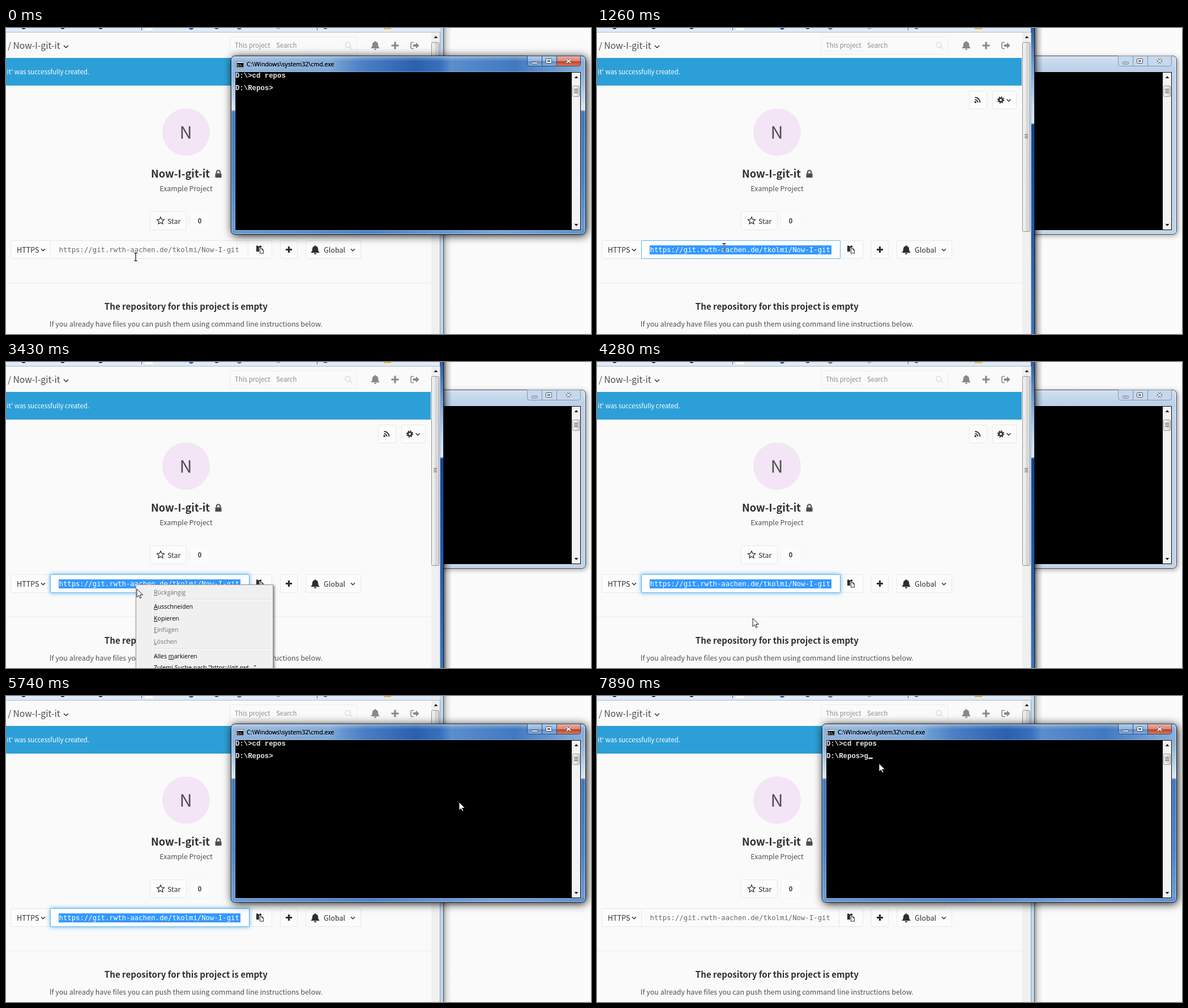
Animation, 1033 px wide and 542 px high, one loop 8000 ms. Source, as an HTML page with a canvas:

```html
<!DOCTYPE html>
<html lang="en">
<head>
<meta charset="utf-8">
<title>Clone address</title>
<style>
html, body { margin: 0; width: 100%; height: 100%; overflow: hidden; background: #fbfbfb; }
canvas { display: block; }
</style>
</head>
<body>
<canvas id="stage" width="1033" height="542"></canvas>
<script>
const ctx = document.getElementById('stage').getContext('2d');
const LOOP = 8000;
const WEB = '"Noto Sans CJK JP", "Noto Sans CJK SC", "Noto Sans CJK", "Open Sans", sans-serif';
const SYSTEM = '"Open Sans", "Noto Sans", sans-serif';
const MONO = '"DejaVu Sans Mono", monospace';
const CONSOLE = '"Liberation Mono", monospace';
const DARK = '#2e2e2e', BODY = '#505050', GREY = '#8c8c8c', LINE = '#e7e7e7';

// Pointer poses: start time, shape, x, y
const POINTER = [
  [0, 'beam', 229, 405.5], [550, 'beam', 229, 402.5], [710, 'beam', 226, 393.5], [850, 'beam', 224.5, 388.5],
  [2160, 'beam', 227, 391], [2290, 'beam', 229.5, 392.5],
  [3430, 'arrow', 231, 402], [3550, 'arrow', 249, 442], [3700, 'arrow', 265, 458], [3850, 'arrow', 270, 456],
  [3980, 'arrow', 275, 454], [4590, 'arrow', 261, 449], [4890, 'arrow', 310, 425], [5010, 'arrow', 490, 335],
  [5140, 'arrow', 721, 219], [5290, 'arrow', 787, 193], [5440, 'arrow', 800, 188],
  [6200, 'arrow', 640, 174], [6330, 'arrow', 502, 160], [6480, 'arrow', 500, 140],
  [6610, 'arrow', 499, 126], [6730, 'arrow', 498, 119.5]
];
const CARET = [[280, 850], [6330, 6880], [7340, 7740], [7890, LOOP]];

const BELL = 'M0-8c-1 0-1 1-1 1.200c-3 .6-4.200 3-4.200 5.800 0 3-1 4.500-2.800 6H8c-1.800-1.500-2.800-3-2.800-6 0-2.800-1.200-5.200-4.200-5.800 0-.2 0-1.200-1-1.200zM-2.200 5.800a2.200 2.200 0 0 0 4.400 0z';
const ARROW = 'M0 0v14.500l3.400-3.100 2.300 5 2.200-1-2.300-4.900h4.900z';
const BEAM = 'M-3-7h2l1 1 1-1h2M0-6v12M-3 7h2l1-1 1 1h2';

function rect(x, y, w, h, fill) {
  ctx.fillStyle = fill;
  ctx.fillRect(x, y, w, h);
}

function box(x, y, w, h, r, stroke, fill) {
  ctx.beginPath();
  ctx.roundRect(x + .5, y + .5, w - 1, h - 1, r);
  if (fill) { ctx.fillStyle = fill; ctx.fill(); }
  if (stroke) { ctx.lineWidth = 1; ctx.strokeStyle = stroke; ctx.stroke(); }
}

function disc(x, y, r, fill) {
  ctx.fillStyle = fill;
  ctx.beginPath();
  ctx.arc(x, y, r, 0, 7);
  ctx.fill();
}

function text(str, x, y, size, color, font = WEB, align = 'left', weight = 'normal') {
  ctx.font = `${weight} ${size}px ${font}`;
  ctx.textAlign = align;
  ctx.fillStyle = color;
  ctx.fillText(str, x, y);
}

function shape(path, x, y, fill, stroke, width = 1) {
  const p = new Path2D(path);
  ctx.save();
  ctx.translate(x, y);
  if (fill) { ctx.fillStyle = fill; ctx.fill(p); }
  if (stroke) { ctx.strokeStyle = stroke; ctx.lineWidth = width; ctx.stroke(p); }
  ctx.restore();
}

// stops: offset, color, offset, color ...
function gradient(x0, y0, x1, y1, ...stops) {
  const g = ctx.createLinearGradient(x0, y0, x1, y1);
  for (let i = 0; i < stops.length; i += 2) g.addColorStop(stops[i], stops[i + 1]);
  return g;
}

function shadow(color, blur, offset = 0) {
  ctx.shadowColor = color;
  ctx.shadowBlur = blur;
  ctx.shadowOffsetX = ctx.shadowOffsetY = offset;
}

const chevron = (x, y, size = 3.5) =>
  shape(`M${-size}${-size / 2}L0 ${size / 2}L${size}${-size / 2}`, x, y, null, DARK, 1.5);
const plus = (x, y, r, color) => shape(`M${-r} 0H${r}M0 ${-r}V${r}`, x, y, null, color, 3.2);
const triangle = (x, y, dir) => shape(`M-3.500 ${-2 * dir}h7L0 ${2 * dir}z`, x, y, '#222');
const button = (x, y, w, h) => box(x, y, w, h, 2, LINE, '#fcfcfc');

function star(x, y, r) {
  ctx.beginPath();
  for (let i = 0; i < 10; i++) {
    const a = i * Math.PI / 5 - Math.PI / 2, d = i % 2 ? r * .46 : r;
    ctx.lineTo(x + d * Math.cos(a), y + d * Math.sin(a));
  }
  ctx.closePath();
  ctx.strokeStyle = DARK;
  ctx.lineWidth = 1.2;
  ctx.stroke();
}

function gear(x, y) {
  ctx.strokeStyle = DARK;
  ctx.lineWidth = 2.6;
  ctx.beginPath();
  ctx.arc(x, y, 3.3, 0, 7);
  ctx.stroke();
  ctx.lineWidth = 2;
  ctx.beginPath();
  ctx.setLineDash([5.2 * Math.PI / 8, 5.2 * Math.PI / 8]);
  ctx.arc(x, y, 5.2, 0, 2 * Math.PI);
  ctx.stroke();
  ctx.setLineDash([]);
}

function bookmarkBar() {
  rect(0, 0, 766, 7, '#dfebf8');
  rect(0, 7, 766, 1, '#a9b9cb');
  [31, 100, 167].forEach(x => disc(x, -2, 4, '#222'));
  rect(239, 0, 1, 4, '#555');
  rect(245, 0, 14, 4, '#fff');
  disc(327, -1, 4, '#2c5fa8');
  disc(372, -2, 4, '#345');
  disc(412, -1, 4, '#777');
  disc(481, -2, 4, '#9ab');
  rect(549, 0, 1, 4, '#555');
  disc(564, -2, 4, '#567');
  rect(667, 0, 13, 2, '#f0b429');
}

function header() {
  text('/', 3, 37, 15.7, BODY);
  text('Now-I-git-it', 12.5, 37, 15.7, '#4c4c4c');
  chevron(106, 33, 4);
  box(395, 15, 225, 32, 2, '#ececec', '#fafafa');
  rect(400, 40, 72, 1, '#efefef');
  text('This project', 404, 35, 11.4, GREY);
  text('Search', 477, 35, 11.4, GREY);
  shape('M4 0a4.500 4.500 0 1 0-9 0a4.500 4.500 0 1 0 9 0M3 3l4 4', 604, 30, null, '#dcdcdc', 1.6);
  shape(BELL, 652, 31, '#888');
  plus(687, 31, 6.5, '#888');
  shape('M-2-5.500h-3q-2 0-2 2v7q0 2 2 2h3', 722, 31, null, '#888', 1.6);
  shape('M-3-2h5v-3.500l5.500 5.500-5.500 5.500v-3.500h-5z', 722, 31, '#888');
}

function urlField(focus, glow) {
  const url = 'https://git.rwth-aachen.de/tkolmi/Now-I-git';
  if (focus) {
    ctx.save();
    if (glow) shadow('rgba(45,160,235,.75)', 7);
    box(78, 376, 352, 33, 1, '#62b5ec', '#fff');
    ctx.restore();
    box(78, 376, 352, 33, 1, '#62b5ec', '#fdfdfd');
    rect(93, 385, 321, 16, '#3399ff');
  } else {
    box(78, 376, 350, 33, 0, LINE, '#fbfbfb');
  }
  text(url, 93.5, 397, 12.3, focus ? '#fff' : '#6a6a6a', MONO);
}

function project(focus, glow) {
  disc(318, 184.5, 42, '#f3e5f5');
  text('N', 317.5, 196, 30.5, BODY, WEB, 'center');
  text('Now-I-git-it', 308, 265, 18.3, DARK, WEB, 'center', 'bold');
  shape('M-5.500 0h11v7.500h-11z', 375, 257.5, '#4c4c4c');
  shape('M-3.200 0v-2a3.200 3.200 0 0 1 6.400 0v2', 375, 257.5, null, '#4c4c4c', 2);
  text('Example Project', 318, 289, 12.4, BODY, WEB, 'center');

  button(254, 325, 65, 33);
  star(273, 341.5, 6.8);
  text('Star', 285, 346.5, 12.4, DARK);
  box(325, 325, 35, 33, 2, '#f5f5f5', '#fcfcfc');
  shape('M4-5l-4 5 4 5', 322, 342, '#fafafa', '#e6e6e6');
  text('0', 342, 346, 11, DARK, WEB, 'center', 'bold');

  button(427, 376, 43, 33);
  button(8, 376, 71, 33);
  text('HTTPS', 19, 397.5, 12.6, DARK);
  chevron(65.5, 393);
  urlField(focus, glow);
  shape('M-6-6.500h9v3.500h-4v7h-5zM0-2h4l3 3v6.500h-7z', 448, 392, DARK);
  shape('M1-1h2.500v2.500h2.500v5h-5z', 448, 392, '#fafafa');
  rect(445, 384.5, 3, 2, '#fafafa');
  button(484, 376, 31, 33);
  plus(499.500, 392.500, 5.5, DARK);
  button(529, 376, 98, 33);
  shape(BELL, 546, 393, DARK);
  text('Global', 561, 397.5, 12.6, DARK);
  chevron(612.500, 393);

  rect(0, 451, 751, 1, '#ebebeb');
  text('The repository for this project is empty', 317.8, 499, 15.1, DARK, WEB, 'center', 'bold');
  text('If you already have files you can push them using command line instructions below.',
    317.8, 529, 12.47, BODY, WEB, 'center');
}

function browser(active, focus, glow) {
  rect(773, 0, 14, 542, gradient(773, 0, 787, 0, 0, active ? 'rgba(0,0,0,.6)' : 'rgba(0,0,0,.32)',
    .4, active ? 'rgba(0,0,0,.22)' : 'rgba(0,0,0,.1)', 1, 'rgba(0,0,0,0)'));
  rect(0, 0, 766, 542, '#fafafa');
  bookmarkBar();
  header();
  rect(0, 53, 750, 49, '#2d9fd8');
  text("it' was successfully created.", 147, 82, 11.4, '#fff', WEB, 'right');

  button(657, 111, 32, 33);
  disc(668.2, 131.2, 1.8, DARK);
  shape('M0-5a5 5 0 0 1 5 5M0-9a9 9 0 0 1 9 9', 667.5, 132, null, DARK, 2);
  button(698, 111, 43, 33);
  gear(713, 127.500);
  chevron(727, 128);
  project(focus, glow);

  // page scrollbar and window edge
  rect(751, 8, 15, 534, '#f0f0f0');
  triangle(759, 16, -1);
  box(751, 25, 14, 336, 2, '#8e8e8e', gradient(751, 0, 765, 0, 0, '#f6f6f6', .5, '#e6e6e6', .51, '#d4d4d4', 1, '#dedede'));
  for (let y = 188; y < 196; y += 3) rect(755, y, 6, 1, '#555');
  rect(766, 0, 6, 542, active
    ? gradient(0, 0, 0, 542, 0, '#2c5fa7', .12, '#6f9fd5', .25, '#c4dcf2', .31, '#dbe9f6', .316, '#14448f', .6, '#1f57a8', 1, '#3b78c2')
    : '#c3d7ee');
  rect(766, 8, 1, 534, active ? '#8fb4dd' : '#8b9eb5');
  rect(772, 0, 1, 542, active ? '#0b1526' : '#4b5866');
}

function windowButtons(active) {
  const edge = active ? '#2b4a74' : '#8294aa';
  const blue = gradient(0, 50, 0, 68, 0, '#b5cde8', .48, '#8fb3dc', .5, '#5a8bc7', 1, '#8ab2e2');
  const red = gradient(0, 50, 0, 68, 0, '#e9b0a4', .48, '#da8476', .5, '#bf3a22', 1, '#de8262');
  const pale = '#c6d8ed';
  box(920, 49, 27, 19, [0, 0, 0, 4], edge, active ? blue : pale);
  box(946, 49, 27, 19, 0, edge, active ? blue : pale);
  box(972, 49, 43, 19, [0, 0, 4, 0], edge, active ? red : pale);
  box(928, 60, 11, 4, 1, '#3e4a58', '#fff');
  box(953, 54, 11, 9, 1, '#3e4a58', '#fff');
  box(956, 57, 5, 3, 0, '#3e4a58', active ? '#5b89c0' : pale);
  const cross = 'M-3.500-3l7 6M3.500-3l-7 6';
  shape(cross, 993.5, 58.5, null, '#4a4f58', 3.8);
  shape(cross, 993.5, 58.5, null, '#fff', 2);
}

function consoleWindow(active, typed, caret) {
  ctx.save();
  shadow(active ? 'rgba(0,0,0,.95)' : 'rgba(0,0,0,.4)', active ? 16 : 8, 2);
  box(397, 49, 627, 317, 7, null, active ? '#3a70b8' : '#bfd3ec');
  ctx.restore();

  ctx.save();
  ctx.beginPath();
  ctx.roundRect(397, 49, 627, 317, 7);
  ctx.clip();
  if (active) {
    const side = gradient(0, 50, 0, 366, 0, '#6f9dd2', .14, '#97bae0', .3, '#dce8f4', .31, '#4079c2', .7, '#4a84cb', 1, '#6c9fda');
    rect(397, 49, 627, 317, side);
    rect(397, 49, 627, 29, gradient(397, 0, 1024, 0, 0, '#92b4db', .28, '#78a4d6', .37, '#4a80c4', .52, '#2a60ae',
      .59, '#3770bb', .62, '#5a8ecd', .8, '#4079c1', 1, '#8db1db'));
    rect(397, 50, 627, 9, gradient(0, 50, 0, 59, 0, 'rgba(255,255,255,.35)', 1, 'rgba(255,255,255,0)'));
    rect(397, 357, 627, 9, gradient(397, 0, 1024, 0, 0, '#669ad6', .4, '#4a82c8', .75, '#74a5dc', 1, '#5b90d0'));
  } else {
    rect(397, 49, 627, 29, gradient(0, 49, 0, 78, 0, '#d3e1f2', 1, '#b9cee8'));
  }
  ctx.restore();
  box(397, 49, 627, 317, 7, active ? '#0c1420' : '#3e4650');
  box(398, 50, 625, 315, 6, 'rgba(255,255,255,.55)');
  box(404, 77, 612, 282, 0, 'rgba(255,255,255,.3)');
  windowButtons(active);

  box(407, 59, 13, 11, 1, '#8a8f96', '#000');
  rect(408, 60, 11, 2, '#dfe5ec');
  text('C:\\.', 408.500, 68, 5.5, '#fff', SYSTEM, 'left', 'bold');
  ctx.save();
  shadow('rgba(255,255,255,.95)', 12);
  text('C:\\Windows\\system32\\cmd.exe', 425, 68, 10.6, '#000', SYSTEM);
  ctx.restore();
  text('C:\\Windows\\system32\\cmd.exe', 425, 68, 10.6, '#000', SYSTEM);

  rect(405, 78, 610, 280, '#000');
  text('D:\\>cd repos', 405, 88, 12.33, '#e8e8e8', CONSOLE, 'left', 'bold');
  text('D:\\Repos>' + typed, 405, 110, 12.33, '#e8e8e8', CONSOLE, 'left', 'bold');
  if (caret) rect(472 + typed.length * 7.4, 109, 7.4, 2.5, '#e8e8e8');

  rect(999, 79, 15, 278, '#f3f3f3');
  triangle(1007, 87, -1);
  triangle(1007, 349, 1);
  box(1000, 102, 13, 20, 2, '#979797', gradient(1000, 0, 1013, 0, 0, '#f6f6f6', .5, '#e4e4e4', 1, '#d2d2d2'));
  for (let y = 108; y < 117; y += 3) rect(1003, y, 7, 1, '#444');
}

function menuItem(label, key, y, enabled) {
  const color = enabled ? '#000' : '#707070';
  text(label, 261, y, 10.6, color, SYSTEM);
  if (key < 0) return;
  const start = ctx.measureText(label.slice(0, key)).width;
  rect(261 + start, y + 1, ctx.measureText(label[key]).width, 1, color);
}

function contextMenu(hoverY) {
  ctx.save();
  shadow('rgba(0,0,0,.5)', 4, 2);
  rect(229, 394, 243, 160, '#f0f0f0');
  ctx.restore();
  box(229, 394, 243, 160, 0, '#979797', '#f0f0f0');
  rect(256, 396, 1, 146, '#e2e3e3');
  rect(257, 396, 1, 146, '#fff');
  for (const y of [420, 507]) {
    rect(258, y, 212, 1, '#e0e0e0');
    rect(258, y + 1, 212, 1, '#fff');
  }
  if (hoverY) box(232, hoverY, 238, 21, 3, '#aecff7', gradient(0, hoverY, 0, hoverY + 21, 0, '#eef3f9', 1, '#dbe7f5'));
  menuItem('Rückgängig', 0, 412, false);
  menuItem('Ausschneiden', 0, 437, true);
  menuItem('Kopieren', 0, 458, true);
  menuItem('Einfügen', 0, 478, false);
  menuItem('Löschen', 0, 499, false);
  menuItem('Alles markieren', 6, 525, true);
  menuItem('Zulemi-Suche nach "https://git.rwt..."', -1, 545, true);
}

function pointer(t) {
  const [, kind, x, y] = POINTER.findLast(pose => pose[0] <= t);
  if (kind === 'arrow') {
    shape(ARROW, x, y, '#fff', '#000', .9);
    return;
  }
  // the text beam inverts whatever lies beneath it
  ctx.save();
  ctx.globalCompositeOperation = 'difference';
  shape(BEAM, x, y, null, '#fff', 1.2);
  ctx.restore();
}

function draw(t) {
  const within = (from, to) => t >= from && t < to;
  const browserFront = within(1260, 5740);
  const drawBrowser = () => browser(browserFront, within(1260, 5900), within(1420, 5900));
  const drawConsole = () => consoleWindow(!browserFront, t >= 7740 ? 'g' : '', CARET.some(span => within(...span)));

  rect(0, 0, 1033, 542, '#fbfbfb');
  const layers = [drawBrowser, drawConsole];
  if (browserFront) layers.reverse();
  layers.forEach(layer => layer());
  if (within(2590, 4280)) contextMenu(t >= 3700 ? 444 : t >= 3550 ? 423 : 0);
  pointer(t);
}

const begin = performance.now();
function tick() {
  draw((performance.now() - begin) % LOOP);
  requestAnimationFrame(tick);
}
tick();
</script>
</body>
</html>
```
